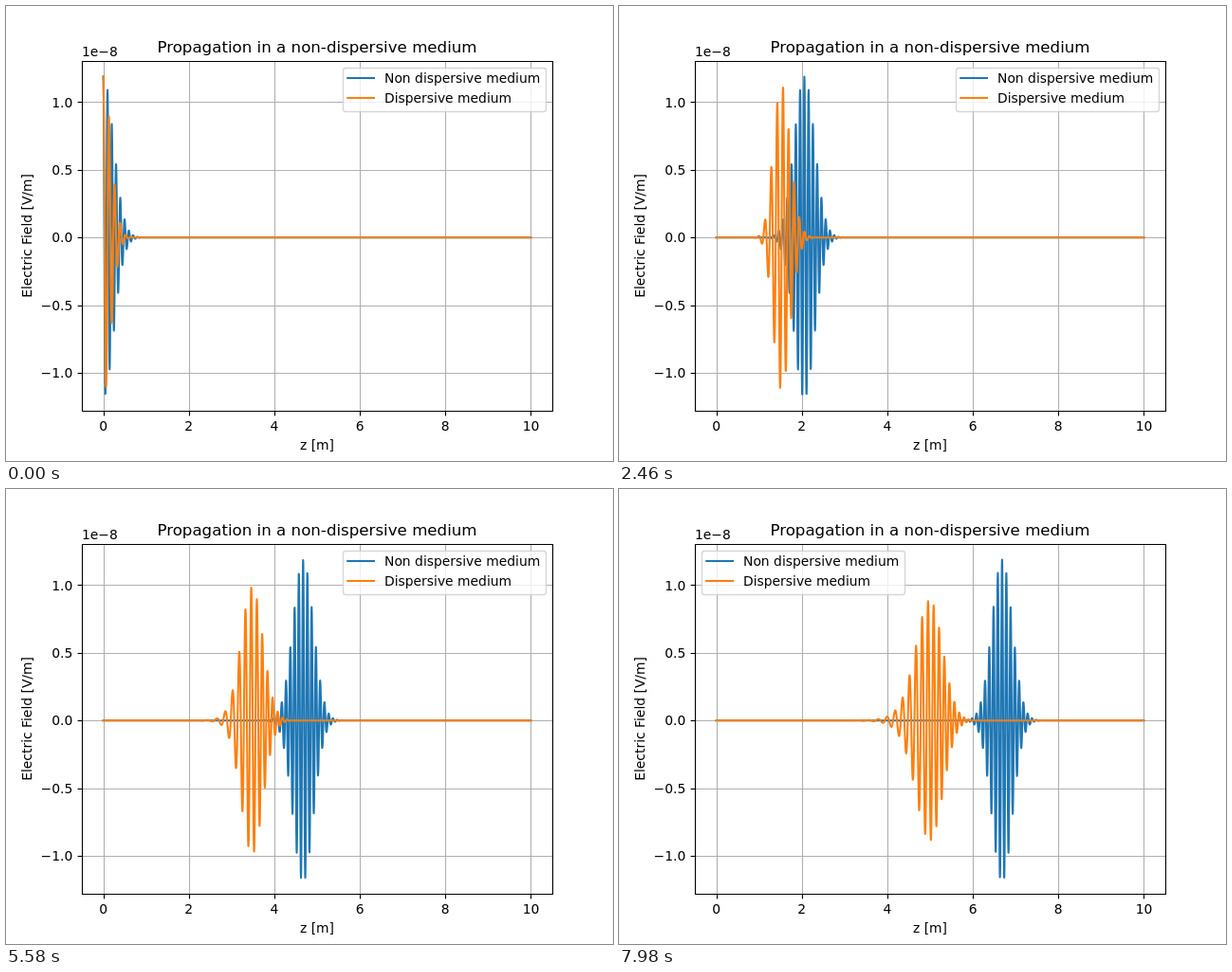
Animation of 640x480 px, one loop 8 s. Source, as an HTML page:

```html
<!DOCTYPE html>
<html lang="en">
<head>
<meta charset="utf-8">
<title>Pulse propagation</title>
<style>
  html, body { margin: 0; width: 100%; height: 100%; overflow: hidden; background: #fff; }
  svg { display: block; width: 640px; height: 480px; }
  text { font: 13.889px "DejaVu Sans", sans-serif; fill: #000; }
  .title { font-size: 16.667px; }
  .mid { text-anchor: middle; }
  .end { text-anchor: end; }
  .grid { stroke: #b0b0b0; stroke-width: 1.11; }
  .axis { stroke: #000; stroke-width: 1.11; fill: none; }
  .wave { fill: none; stroke-width: 2.083; stroke-linejoin: round; stroke-linecap: square; }
  .blue { stroke: #1f77b4; }
  .orange { stroke: #ff7f0e; }
</style>
</head>
<body>
<svg viewBox="0 0 640 480">
  <g id="grid"></g>
  <path id="free" class="wave blue"/>
  <path id="guided" class="wave orange"/>
  <g id="ticks"></g>
  <path class="axis" stroke-linecap="square" d="M80.5 58.5H576.5V427.5H80.5Z"/>
  <text class="title mid" x="328" y="49">Propagation in a non-dispersive medium</text>
  <text x="80" y="53">1e−8</text>
  <text class="mid" x="328" y="468">z [m]</text>
  <text class="mid" transform="translate(27 242.4) rotate(-90)">Electric Field [V/m]</text>
  <g id="legend">
    <rect x="355.5" y="65.5" width="214" height="46" rx="2.8" fill="#fff" fill-opacity=".8"
      stroke="#ccc" stroke-opacity=".8" stroke-width="1.39"/>
    <path class="wave blue" d="M360.3 76H388"/>
    <path class="wave orange" d="M360.3 97H388"/>
    <text x="399" y="81">Non dispersive medium</text>
    <text x="399" y="102">Dispersive medium</text>
  </g>
</svg>
<script>
const $ = id => document.getElementById(id);
const LOOP = 8000, STEP = 60, LEGEND_MOVE = 110;

// Plot scale: metres and 1e-8 V/m to pixels
const px = z => 102.545 + 45.091 * z;
const py = e => 244.2 - 142.8 * e;
const snap = v => Math.floor(v + 0.5) + 0.5;

// Gaussian pulse on a 3 GHz carrier; the dispersive line has a 2 GHz cutoff
const AMP = 1.189, DECAY = 8.75;
const K0 = 2 * Math.PI / 0.1, KC = K0 * 2 / 3;
const VG = Math.sqrt(1 - (KC / K0) ** 2);

const modes = [];
let total = 0;
for (let q = -16.5; q <= 16.51; q += 0.75) {
  const k = K0 + q, w = Math.exp(-q * q / (4 * DECAY));
  modes.push({ k, b: Math.sqrt(k * k - KC * KC), w });
  total += w;
}

const free = (z, s) => AMP * Math.exp(-DECAY * (z - s) ** 2) * Math.cos(K0 * (z - s));

function guided(z, s) {
  let sum = 0;
  for (const m of modes) sum += m.w * Math.cos(m.k * s - m.b * z);
  return AMP * sum / total;
}

// Trace the field near the pulse; it is flat elsewhere
function trace(field, s, from, to) {
  const dz = 0.004;
  const first = Math.max(0, Math.ceil(from / dz)), last = Math.min(2500, Math.floor(to / dz));
  let d = first > 0 ? `M${px(0)} ${py(0)}` : "";
  for (let i = first; i <= last; i++) {
    const z = i * dz;
    d += `${d ? "L" : "M"}${px(z).toFixed(2)} ${py(field(z, s)).toFixed(2)}`;
  }
  return d + `L${px(10)} ${py(0)}`;
}

function buildAxes() {
  let grid = "", ticks = "";
  for (let z = 0; z <= 10; z += 2) {
    const x = snap(px(z));
    grid += `<path class="grid" d="M${x} 58.5V427.5"/>`;
    ticks += `<path class="axis" d="M${x} 427.5V432.4"/><text class="mid" x="${px(z)}" y="448">${z}</text>`;
  }
  for (let e = -1; e <= 1; e += 0.5) {
    const y = snap(py(e)), label = e.toFixed(1).replace("-", "−");
    grid += `<path class="grid" d="M80.5 ${y}H576.5"/>`;
    ticks += `<path class="axis" d="M80.5 ${y}H75.6"/><text class="end" x="70.3" y="${py(e) + 5.2}">${label}</text>`;
  }
  $("grid").innerHTML = grid;
  $("ticks").innerHTML = ticks;
}

let shown = -1;
function render(ms) {
  const n = Math.floor((ms % LOOP) / STEP);
  if (n === shown) return;
  shown = n;
  const s = 10 * n / 199, c = VG * s;
  $("free").setAttribute("d", trace(free, s, s - 1.3, s + 1.3));
  $("guided").setAttribute("d", trace(guided, s, c - 2, c + 1.6));
  $("legend").setAttribute("transform", `translate(${n < LEGEND_MOVE ? 0 : -268} 0)`);
}

buildAxes();
render(0);
const start = performance.now();
function tick() {
  render(performance.now() - start);
  requestAnimationFrame(tick);
}
requestAnimationFrame(tick);
</script>
</body>
</html>
```
